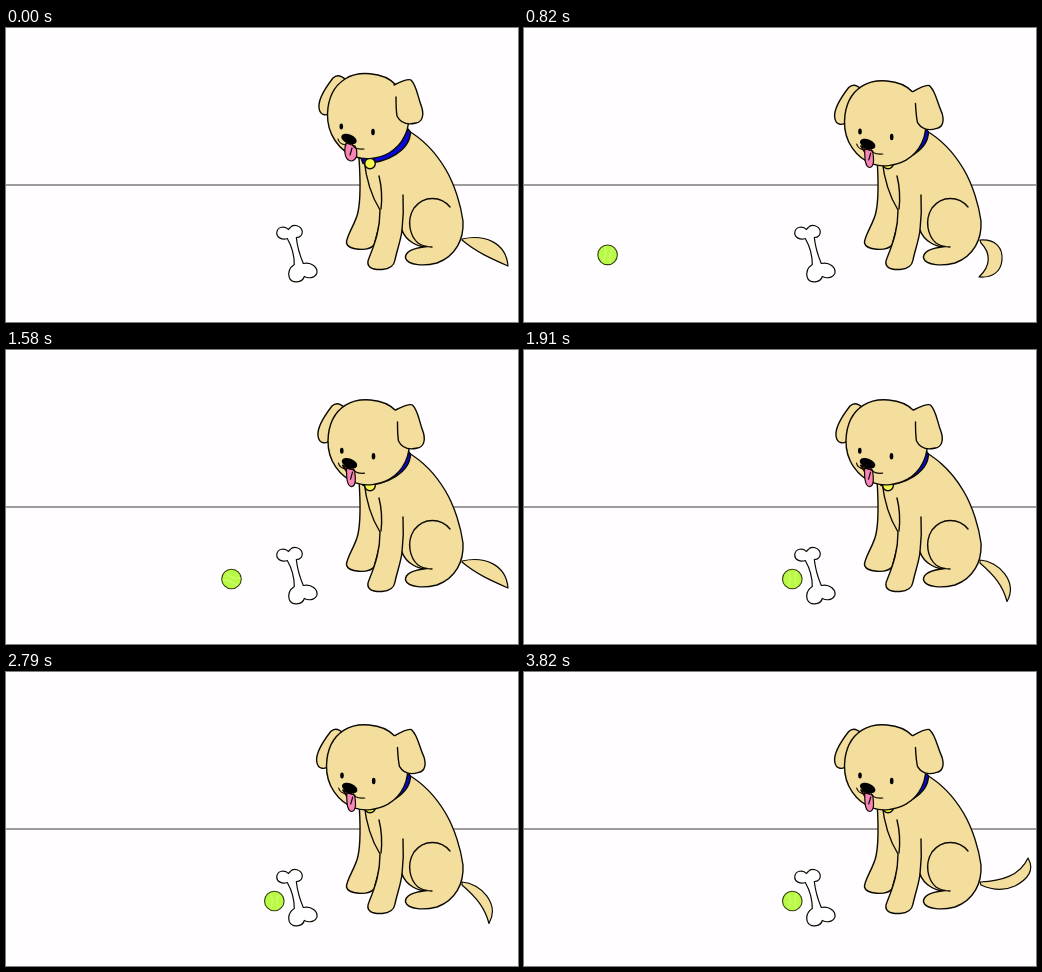
An HTML page that plays this animation: 512 by 294 pixels, repeating every 3880 ms.

```html
<!DOCTYPE html>
<html lang="en">
<head>
<meta charset="utf-8">
<title>Puppy and ball</title>
<style>
  html, body { margin: 0; width: 100%; height: 100%; overflow: hidden; background: #fffdff; }
  svg { display: block; width: 512px; height: 294px; }
  .ink { stroke: #0b0903; stroke-width: 1.4; stroke-linecap: round; stroke-linejoin: round; }
  .thin { stroke-width: 1.2; }
  .fur { fill: #f3de9d; }
  .line { fill: none; }
</style>
</head>
<body>
<svg viewBox="0 0 512 294">
  <path d="M0 157H512" stroke="#3c3a3c"/>

  <path d="M284 199C287 195 295 197 296 203C296 208 293 209 290 209C291 218 294 228 297 235C305 233 312 239 310.500 245C308 250 302 250 298 248C296 255 285 255 283 249C281 242 285 238 288 236C288 226 285 217 281 210C276 212 270 209 270.500 204C271 198 279 197 282 201Z" class="ink thin" fill="#fff" transform="translate(.3 .5)"/>

  <g id="ball">
    <circle r="9.800" fill="#b9fa45" stroke="#34400f" stroke-width="1.100"/>
    <path id="seams" d="M-4-8Q0 0-4 8M4-8Q1 0 4 8" fill="none" stroke="#d3fb83"/>
  </g>

  <path id="tail" class="ink thin fur"/>

  <g class="ink fur">
    <path d="M353 130C354 145 355 170 352 184C350 195 340 208 340.500 215C342 222 362 224 368 217L378 180L365 130Z"/>
    <path d="M358 131C360 150 364 166 374 182C374 200 370 213 363 230C359 239 366 242 376 241.500C384 241 388 238 389 232C391 222 395 212 396 202C398 208 402 212 407 215Q413 219 421 218.500C407 220 399 224 399.500 230C402 238 419 238 431 235C450 228 458 211 457 193C455 178 449 157 439.500 141C430 125 417 111 401 102Z"/>
    <path class="line" d="M373 148Q377 164 375 181M397 167Q398 185 396 202M444 179C435 168 418 167 408 180C400 193 404 208 412 215Q418 219 426 219"/>
    <path d="M355 130C372 131 394 122 402 101L404.500 104C404 122 382 135 357 135.500Z" fill="#0808dc"/>
    <circle cx="364" cy="135.500" r="5.300" fill="#f5f650"/>
  </g>

  <path id="leftEar" class="ink fur" d="M340 52C336 48 331 46 327 50C320 59 312 72 313 80C314 88 322 89 325 83Z"/>
  <path id="head" class="ink fur" d="M339 51C351 43 377 43 390 57L402 85C405 100 397 117 383 125C372 131 359 132 350 129C333 123 321 106 321.500 86C322 71 328 58 339 51Z"/>
  <g id="rightEar" class="ink fur">
    <path stroke="none" d="M386 58L405 52L416 86L400 95L390 85Z"/>
    <path d="M388 57C394 54 402 50 405 52C411 58 411 67 416 80C418 88 416 94 410 95C402 97 395 96 391 88C390 82 390 76 390 69"/>
  </g>

  <g id="face">
    <ellipse cx="335.300" cy="98.500" rx="1.800" ry="3"/>
    <ellipse cx="367" cy="104" rx="1.800" ry="3.200"/>
    <path id="mouth" d="M336 113L341 121L345 117Z" fill="#a51f24" class="ink"/>
    <path id="tongue" class="ink thin" fill="#f984b8"/>
    <path class="ink thin line" d="M332 111Q333 116 340 117M346 115Q347 122 358 121M346 120Q345 124 344 127"/>
    <ellipse rx="8.200" ry="4.600" transform="translate(343 111)rotate(22)"/>
  </g>
</svg>
<script>
  const LOOP = 3880, HOLD = 47.7, LAST = 80;
  const part = id => document.getElementById(id);
  const move = (id, x, y, angle = 0) =>
    part(id).setAttribute("transform", `translate(${x} ${y})rotate(${angle} 390 60)`);

  // Tail from highest to lowest
  const tails = [
    "M456 210C477 209 496 204 504 186C511 198 504 207 491 214C478 220 466 217 457 213Z",
    "M456 210C472 206 484 208 506 214C494 223 474 227 457 212Z",
    "M456 211C478 206 500 214 502 238C486 231 470 224 456 212Z",
    "M456 210C475 211 494 232 483 251.500C479 236 471 226 456 213Z",
    "M456 212C472 211 479 220 478 232C477 244 468 250 455 249C467 238 467 225 457 215Z"
  ];
  const tongues = {
    wide: "M340 115C337 126 340 133 346 133C352 131 352 123 349 118Z",
    narrow: "M340 116C340 124 340 134 345 134.500C350 134 349 125 348 118Z"
  };
  const poses = {
    up: { head: [0, 0], leftEar: [0, 0], rightEar: [0, 0], face: [0, 0] },
    mid: { head: [.5, 4.2], leftEar: [-1, 6], rightEar: [1.5, 3], face: [.5, 2.2] },
    down: { head: [-1, 7.2], leftEar: [-2.3, 9.5], rightEar: [1, 6.5, -3], face: [.7, 5] }
  };
  const nod = ["up", "mid", "down", "down", "mid", "mid", "up"];

  function drawDog(step) {
    const name = nod[step % nod.length];
    for (const [id, place] of Object.entries(poses[name])) move(id, ...place);
    part("tongue").setAttribute("d", name === "up" ? tongues.wide : tongues.narrow);
    part("mouth").style.display = name === "up" ? "none" : "";

    // Triangle wave with slightly longer rests at both ends
    const swing = 4 - Math.abs((6.17 + 1.32 * step) % 8 - 4);
    const index = Math.round(2 + (swing - 2) * 1.11);
    part("tail").setAttribute("d", tails[Math.max(0, Math.min(4, index))]);
  }

  function drawBall(step) {
    const x = Math.min(268.3, 32 + 12.9 * (Math.floor(.69 * step + .17) - 7));
    move("ball", x, Math.min(229, 223.5 + x * .04));
    part("seams").setAttribute("transform", `rotate(${(x - 268.3) * 5.8})`);
  }

  function draw() {
    const step = Math.min(LAST, Math.floor(performance.now() % LOOP / HOLD));
    drawDog(step);
    drawBall(step);
    requestAnimationFrame(draw);
  }
  draw();
</script>
</body>
</html>
```
